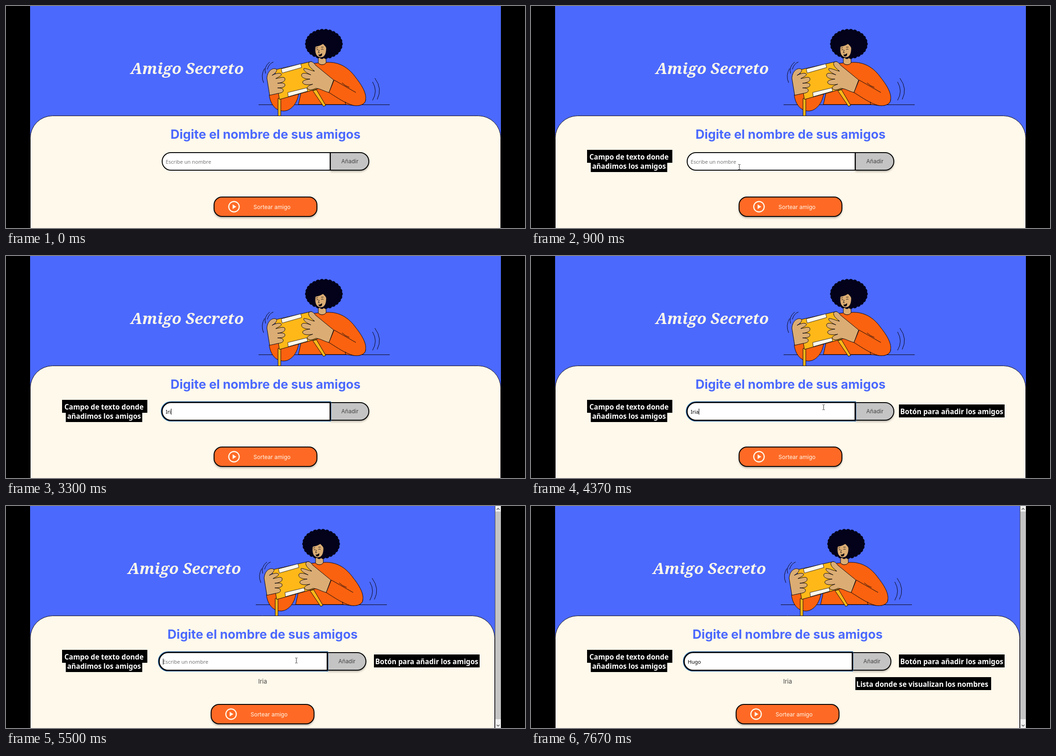
An HTML page with a canvas that plays this animation: 1120 px wide and 480 px high, repeating every 8 s.

```html
<!DOCTYPE html>
<html lang="es">
<head>
<meta charset="utf-8">
<title>Amigo Secreto</title>
<style>
  html, body { margin: 0; width: 100%; height: 100%; overflow: hidden; background: #000; }
  canvas { display: block; }
</style>
</head>
<body>
<canvas id="stage" width="1120" height="480"></canvas>
<script>
const ctx = document.getElementById('stage').getContext('2d');
const LOOP = 8000;
const ADDED = 4800;
const FIRST = 'Iria';
const SECOND = 'Hugo';

const BLUE = '#4b69fd', CREAM = '#fff9eb', GREY = '#c4c4c4', GREY_HOVER = '#a1a1a1';
const INK = '#0a0610', BLACK = '#050505', HAIR = '#03021a';
const ORANGE = '#fb620f', BUTTON = '#fe6a26', SKIN = '#dbad74', GOLD = '#ffb818';
const UI = 'Inter, sans-serif', FIELD = '"Noto Sans", sans-serif';

const firstKeys = [2830, 3100, 3300, 3500];
const secondKeys = [6470, 6900, 7130, 7370];

// Each move starts where the previous one ended; bow lifts the middle of the path.
const pointerStart = { x: 538, y: -16 };
const pointerMoves = [
  { from: 370, to: 900, x: 449, y: 348, bow: 0 },
  { from: 1100, to: 1230, x: 440, y: 345, bow: 0 },
  { from: 1400, to: 1730, x: 451, y: 337, bow: -26 },
  { from: 4200, to: 4630, x: 733, y: 338, bow: -12 },
  { from: 4930, to: 5430, x: 626, y: 334, bow: 0 },
  { from: 5670, to: 5900, x: 620, y: 336, bow: -18 }
];

const within = (t, a, b) => t >= a && t < b;
const clamp01 = v => Math.min(1, Math.max(0, v));
const easeOut = k => 1 - (1 - k) ** 2;

function shape(d, fill, stroke, width = 1) {
  const path = new Path2D(d);
  if (fill) { ctx.fillStyle = fill; ctx.fill(path); }
  if (stroke) { ctx.strokeStyle = stroke; ctx.lineWidth = width; ctx.stroke(path); }
}

function rounded(x, y, w, h, radii, fill, stroke, width = 2) {
  ctx.beginPath();
  ctx.roundRect(x, y, w, h, radii);
  if (fill) { ctx.fillStyle = fill; ctx.fill(); }
  if (stroke) { ctx.strokeStyle = stroke; ctx.lineWidth = width; ctx.stroke(); }
}

function rect(x, y, w, h, fill) {
  ctx.fillStyle = fill;
  ctx.fillRect(x, y, w, h);
}

function text(str, x, y, font, fill, align = 'center') {
  ctx.font = font;
  ctx.fillStyle = fill;
  ctx.textAlign = align;
  ctx.fillText(str, x, y);
}

function withShadow(draw) {
  ctx.save();
  ctx.shadowColor = 'rgba(0, 0, 0, 0.35)';
  ctx.shadowBlur = 4;
  ctx.shadowOffsetY = 3;
  draw();
  ctx.restore();
}

function drawHead() {
  shape('M674 106 L674 123 C678 129 688 128 691 123 L690 106Z', SKIN, INK);
  ctx.fillStyle = HAIR;
  ctx.beginPath();
  ctx.ellipse(686, 82, 38, 30, 0, 0, Math.PI * 2);
  ctx.fill();
  for (let i = 0; i < 26; i++) {
    const a = i / 26 * Math.PI * 2;
    ctx.beginPath();
    ctx.arc(686 + Math.cos(a) * 35.5, 82 + Math.sin(a) * 27.5, 5.2, 0, Math.PI * 2);
    ctx.fill();
  }
  shape('M668 88 C674 87 680 85 684 82 C687 85 690 87 691 91 C691 102 688 111 679 111 C670 110 666 102 668 88Z', SKIN);
  shape('M670 95 q2 -2 4 0 M680 94 q3 -2 5 0 M669 91 l4 -1 M680 89 l5 0 M676 95 l-2 6 l3 0', null, INK, 0.9);
  shape('M674 105 Q678 106 682 102 Q683 109 678 109 Q675 109 674 105Z', INK);
}

function drawIllustration() {
  ctx.lineJoin = 'round';
  shape('M545 213.5 H828', null, INK, 1.2);
  shape('M558 135 Q549 150 556 166 M569 121 Q556 132 560 146 M577 121 Q567 125 564 137', null, INK);
  shape('M791 164 Q803 184 791 204 M796 156 Q813 179 801 202', null, INK);
  drawHead();

  shape('M631 213 L636 190 L660 150 L665 124 L674 123 C678 129 688 128 691 122 C720 120 740 134 755 155 C770 174 778 190 776 202 C776 214 760 217 750 215 L733 213Z', ORANGE, INK);
  shape('M568 192 L590 188 L632 186 C630 210 615 227 599 227 C580 227 570 210 568 192Z', ORANGE, INK);

  shape('M587 200 L587 240 H593 V199Z M662 183 L685 217 L690 215 L670 181Z', GOLD, INK);
  shape('M580 138 L659 120 L673 179 L590 202Z', GOLD, INK);
  shape('M594 136 L636 125 L638 133 L596 145Z M608 187 L649 177 L651 184 L609 196Z', CREAM, INK, 0.8);

  shape('M584 137 C576 132 564 140 563 156 L569 193 L587 189 C594 188 600 186 598 181 C597 177 590 178 586 177 C594 177 602 176 602 171 C602 165 592 167 586 167 C594 166 603 164 602 157 C600 151 590 156 582 157 C588 153 596 151 594 147 C590 143 580 147 574 150 C580 146 586 141 584 137Z', SKIN, INK);
  shape('M653 123 C658 117 664 122 668 128 L707 160 L697 187 C685 184 678 178 668 178 C658 183 652 182 650 177 C651 172 658 171 662 169 C652 171 641 171 640 165 C640 160 650 159 656 158 C646 158 636 155 638 148 C640 143 650 146 658 149 C652 146 640 140 643 135 C650 135 656 139 666 141 C660 136 652 130 653 123Z', SKIN, INK);

  shape('M708 160 L752 185 L776 202 C776 214 760 217 750 215 C733 211 716 199 697 187Z', ORANGE);
  shape('M755 187 L708 160 L697 187 C716 199 733 211 750 215 C760 217 776 214 776 202 M725 166 Q732 173 741 176 M732 207 L733 213', null, INK);
}

function typedText(t) {
  const [name, keys] = t < ADDED ? [FIRST, firstKeys] : [SECOND, secondKeys];
  return name.slice(0, keys.filter(k => t >= k).length);
}

function caretOn(t) {
  return within(t, 1400, 1900) || within(t, 2430, 3530) || within(t, 4030, 4560) ||
    within(t, 5470, 6070) || within(t, 6470, 7670);
}

function drawField(t) {
  const focused = within(t, 1400, ADDED) || t >= 5470;
  rounded(337, 317, 363, 38, [19, 0, 0, 19], '#fff', BLACK);
  if (focused) {
    rounded(335, 315, 366, 42, [21, 1, 1, 21], null, '#1d62a8', 1.6);
    rounded(336.5, 316.5, 363, 39, [20, 0, 0, 20], null, BLACK);
  }
  const value = typedText(t);
  const font = '11.1px ' + FIELD;
  text(value || 'Escribe un nombre', 344.5, 341, font, value ? '#000' : '#757575', 'left');
  if (caretOn(t)) {
    const width = value ? ctx.measureText(value).width : 0;
    rect(Math.round(344.5 + width), 330, 1, 13, '#000');
  }
}

function drawAddButton(hover) {
  withShadow(() => rounded(700, 317, 83, 38, [0, 19, 19, 0], hover ? GREY_HOVER : GREY));
  rounded(700, 317, 83, 38, [0, 19, 19, 0], null, BLACK);
  text('Añadir', 742, 340, '12px ' + UI, '#444');
}

function drawDrawButton() {
  withShadow(() => rounded(449, 413, 222, 42, 17, BUTTON));
  rounded(449, 413, 222, 42, 17, null, BLACK);
  ctx.strokeStyle = CREAM;
  ctx.lineWidth = 2.4;
  ctx.beginPath();
  ctx.arc(492, 434, 11.3, 0, Math.PI * 2);
  ctx.stroke();
  shape('M489 429 L497 434 L489 439Z', CREAM);
  text('Sortear amigo', 574, 439, '12px ' + UI, CREAM);
}

function drawScrollbar() {
  rect(1055, 0, 13, 480, '#f1f1f1');
  rect(1056, 12, 12, 449, GREY);
  rect(1055, 0, 1, 480, '#4a4a4a');
  shape('M1059 8 L1062 5 L1065 8 M1059 473 L1062 476 L1065 473', null, '#505050', 1.4);
}

function drawPage(t, hover) {
  const added = t >= ADDED;
  const right = added ? 1055 : 1068;
  rect(52, 0, 1016, 480, BLUE);

  ctx.save();
  if (added) ctx.translate(-6, 0);
  text('Amigo Secreto', 391, 147, 'italic bold 33.6px "Noto Serif", serif', CREAM);
  drawIllustration();
  ctx.restore();

  rounded(52.5, 237.5, right - 53, 300, [48, 48, 0, 0], CREAM, INK, 1);

  ctx.save();
  if (added) ctx.translate(-6.3, 0);
  text('Digite el nombre de sus amigos', 560, 286.5, 'bold 27px ' + UI, BLUE);
  drawAddButton(hover);
  drawField(t);
  rect(698.5, 316, 2.5, 40, BLACK);
  if (added) {
    text(FIRST, 560, 383.5, '13px ' + UI, '#444');
    ctx.translate(0, 16);
  }
  drawDrawButton();
  ctx.restore();

  if (added) drawScrollbar();
}

function drawLabels(t) {
  const font = 'bold 15.2px "Noto Sans", sans-serif';
  const label = (str, x, y, w, h, cx, base) => {
    rect(x, y, w, h, '#000');
    text(str, cx, base, font, '#fff');
  };
  if (t >= 600) {
    label('Campo de texto donde', 121, 311, 184, 28, 211.5, 332);
    label('añadimos los amigos', 129, 339, 165, 20, 211.5, 352);
  }
  if (t >= 4270) label('Botón para añadir los amigos', 794, 321, 228, 28, 908, 342);
  if (t >= 6530) label('Lista donde se visualizan los nombres', 700, 370, 293, 28, 844.5, 391);
}

// The pointer stays hidden while a name is being typed.
function pointerAt(t) {
  if (!within(t, 370, firstKeys[0]) && !within(t, 4200, secondKeys[0])) return null;
  let { x, y } = pointerStart;
  for (const move of pointerMoves) {
    const k = easeOut(clamp01((t - move.from) / (move.to - move.from)));
    x += (move.x - x) * k;
    y += (move.y - y) * k + move.bow * Math.sin(Math.PI * k);
  }
  return { x, y };
}

function drawPointer(p, hover) {
  ctx.save();
  ctx.translate(Math.round(p.x), Math.round(p.y));
  if (hover) {
    shape('M-3 -7 Q-1.5 -9 0 -7 V-2 Q1.5 -3 2.5 -1.5 Q4 -2.5 5 -0.5 Q7 -1 7 1 V5 L5 10 H-1 L-6 2 Q-6 0 -4.5 0.5 L-3 2Z', '#fff', '#111');
  } else if (p.y > 308) {
    shape('M-2 -5.5 H0 M1 -5.5 H3 M0.5 -5 V5 M-2 5.5 H0 M1 5.5 H3', null, '#333', 1);
  } else {
    shape('M0 0 V14 L3.3 11 L5.5 16 L7.7 15 L5.5 10.3 H10Z', '#fff', '#111');
  }
  ctx.restore();
}

function frame(now) {
  const t = now % LOOP;
  const pointer = pointerAt(t);
  const hover = Boolean(pointer && pointer.x > 700);
  rect(0, 0, 1120, 480, '#000');
  drawPage(t, hover);
  drawLabels(t);
  if (pointer) drawPointer(pointer, hover);
  requestAnimationFrame(frame);
}
requestAnimationFrame(frame);
</script>
</body>
</html>
```
